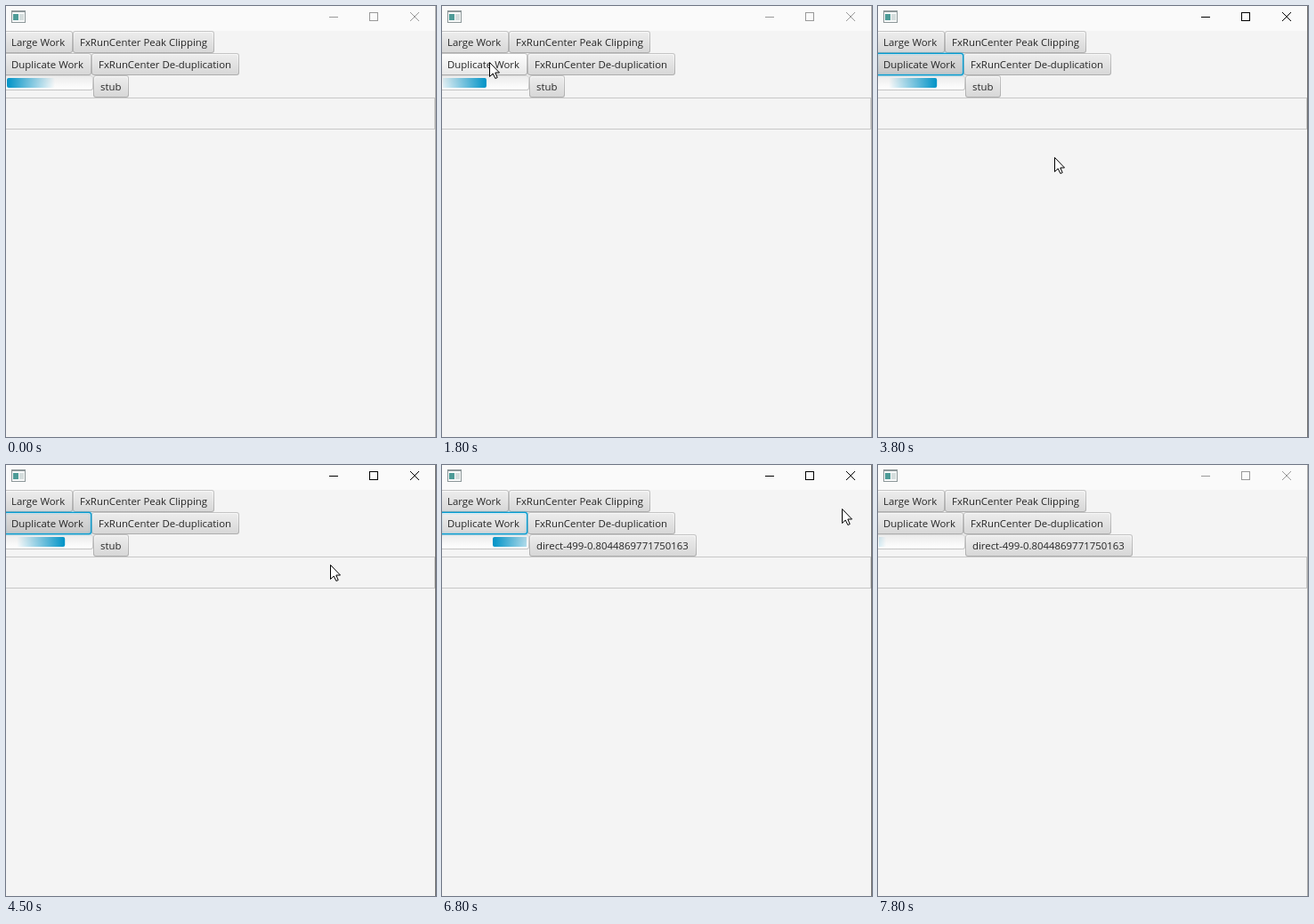
An HTML page with a canvas that plays this animation: 483 by 485 pixels, repeating every 7900 ms.

```html
<!DOCTYPE html>
<html lang="en">
<head>
<meta charset="utf-8">
<style>
  html, body { margin: 0; width: 100%; height: 100%; overflow: hidden; background: #f4f4f4; }
  canvas { display: block; }
</style>
</head>
<body>
<canvas id="stage" width="483" height="485"></canvas>
<script>
const ctx = document.getElementById('stage').getContext('2d');
const LOOP = 7900, STEP = 100, ROW = 25;
const HOVERED_AT = 800, FROZEN_AT = 1900, RESUMED_AT = 6800, DEACTIVATED_AT = 7600;

// Places the pointer glides between
const stops = [
  { at: 100, x: 330, y: 167 },
  { at: 800, x: 73, y: 57 },
  { at: 1100, x: 44, y: 76 },
  { at: 1700, x: 53, y: 63, leave: 3100 },
  { at: 3500, x: 215, y: 231 },
  { at: 3800, x: 198, y: 170 },
  { at: 4600, x: 388, y: 104 },
  { at: 5200, x: 449, y: 49, leave: 6900 },
  { at: 7300, x: 486, y: 38 }
];

const mix = (a, b, k) => a + (b - a) * k;
const gray = level => `rgb(${level},${level},${level})`;

function pointerAt(t) {
  const next = stops.findIndex(s => s.at >= t);
  if (next < 0 || t < stops[0].at) return null;
  const b = stops[next], a = stops[next - 1] || b;
  const left = a.leave || a.at;
  const k = a === b ? 0 : Math.max(0, (t - left) / (b.at - left));
  return { x: Math.round(mix(a.x, b.x, k)), y: Math.round(mix(a.y, b.y, k)) };
}

function box(x, y, w, h, fill, r = 0) {
  ctx.fillStyle = fill;
  ctx.beginPath();
  ctx.roundRect(x, y, w, h, r);
  ctx.fill();
}

function shadedBox(x, y, w, h, top, bottom, r) {
  const fill = ctx.createLinearGradient(0, y, 0, y + h);
  fill.addColorStop(0, gray(top));
  fill.addColorStop(1, gray(bottom));
  box(x, y, w, h, fill, r);
}

function line(x1, y1, x2, y2) {
  ctx.beginPath();
  ctx.moveTo(x1, y1);
  ctx.lineTo(x2, y2);
  ctx.stroke();
}

function button(x, row, w, label, level = 236, focused = false) {
  const y = 28 + row * ROW;
  const body = inset => shadedBox(x + inset, y + inset, w - 2 * inset, ROW - 2 * inset, level, level - 20, 2);
  if (focused) box(x - 0.2, y - 0.2, w + 0.4, ROW + 0.4, '#039ed3', 3);
  else shadedBox(x, y, w, ROW, 196, 173, 3);
  shadedBox(x + 1, y + 1, w - 2, ROW - 2, Math.min(255, level + 12), level - 20, 2);
  body(2);
  if (focused) {
    box(x - 1.4, y - 1.4, w + 2.8, ROW + 2.8, 'rgba(3,158,211,0.13)', 4);
    body(2.6);
  }
  ctx.fillStyle = '#262626';
  ctx.fillText(label, x + 8, y + 17);
}

function titleBar(active) {
  box(0, 0, 483, 28, '#fafafa');
  box(6, 5, 16, 14, '#8d9799');
  box(7, 7, 14, 11, '#f7f9f9');
  box(8, 9, 6, 7, '#4d9b97');
  box(15, 9, 5, 7, '#d5dddd');

  ctx.strokeStyle = active ? '#000' : '#999';
  line(363, 12.5, 373, 12.5);
  ctx.strokeRect(408.5, 7.5, 9, 9);
  line(454, 7, 464, 17);
  line(454, 17, 464, 7);
}

function easeBoth(u) {
  if (u > 0.5) return 1 - easeBoth(1 - u);
  return u < 0.2 ? 3.125 * u * u : 1.25 * u - 0.125;
}

// The bar sweeps right, then flips and sweeps back in each 4 s cycle.
function progressBar(t) {
  shadedBox(-2, 78, 100, 17, 217, 194, 3);
  shadedBox(-1, 79, 98, 15, 236, 255, 2);

  const elapsed = t < RESUMED_AT ? Math.min(t, FROZEN_AT + 50) : t - RESUMED_AT;
  const phase = (t < RESUMED_AT ? 3000 : 2440) + elapsed * 1.083;
  const travel = easeBoth(phase % 4000 / 4000);
  const rightward = travel <= 0.5;
  const x = -59 + 320 * Math.min(travel, 1 - travel);
  const head = rightward ? x + 54 : x, tail = rightward ? x : x + 54;
  const fade = ctx.createLinearGradient(head, 0, tail, 0);
  fade.addColorStop(0, 'rgba(0,147,199,1)');
  fade.addColorStop(1, 'rgba(0,147,199,0)');
  ctx.save();
  ctx.beginPath();
  ctx.rect(1, 81, 94, 11);
  ctx.clip();
  box(x, 81, 54, 11, fade, 2);
  ctx.restore();
}

const arrow = new Path2D('M0 0V16L3.7 12.5L6.4 18L8.7 17L6.3 11.5H11Z');

function pointer({ x, y }) {
  ctx.save();
  ctx.translate(x + 0.5, y + 0.5);
  ctx.fillStyle = '#fff';
  ctx.fill(arrow);
  ctx.strokeStyle = '#000';
  ctx.stroke(arrow);
  ctx.restore();
}

function draw(t) {
  const active = t >= FROZEN_AT && t < DEACTIVATED_AT;
  const done = t >= RESUMED_AT;
  const hovered = t >= HOVERED_AT && t < FROZEN_AT;
  const level = hovered ? 252 : active && !done ? 220 : 236;

  box(0, 0, 483, 485, '#f4f4f4');
  titleBar(active);
  ctx.font = '11.4px "Open Sans", sans-serif';
  button(-2, 0, 77, 'Large Work');
  button(75, 0, 159, 'FxRunCenter Peak Clipping');
  button(96, 1, 166, 'FxRunCenter De-duplication');
  progressBar(t);
  button(-2, 1, 98, 'Duplicate Work', level, active);
  if (done) button(98, 2, 188, 'direct-499-0.8044869771750163');
  else button(98, 2, 40, 'stub');

  ctx.strokeStyle = '#c8c8c8';
  ctx.strokeRect(-1.5, 103.5, 483, 35);
  box(482, 0, 1, 485, active ? '#707070' : '#aaa');

  const tip = pointerAt(t);
  if (tip) pointer(tip);
}

function tick() {
  const t = performance.now() % LOOP;
  draw(Math.floor(t / STEP) * STEP);
  requestAnimationFrame(tick);
}
tick();
</script>
</body>
</html>
```
